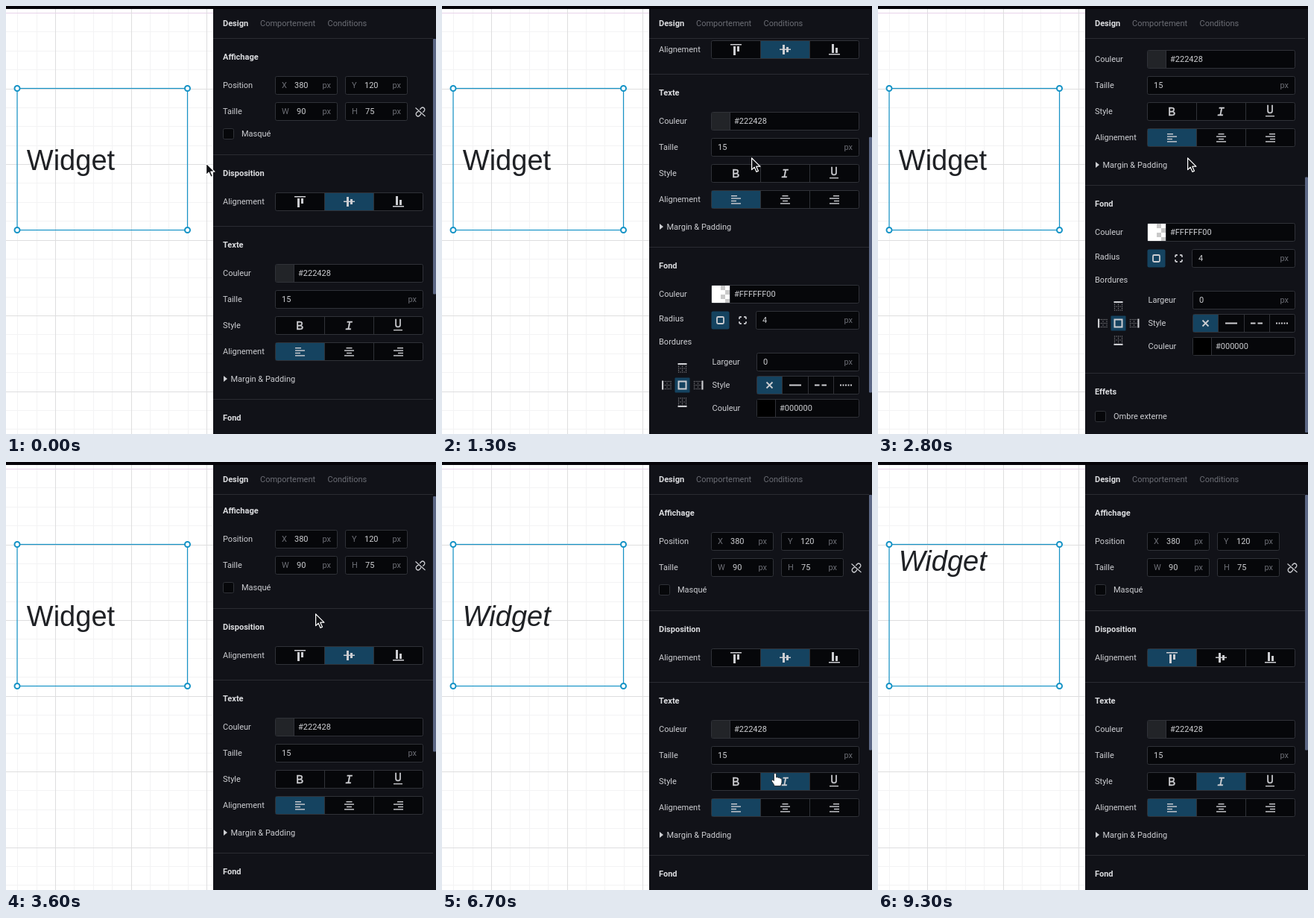
An HTML page with a canvas that plays this animation: 577x574 px, repeating every 9.7 s.

```html
<!DOCTYPE html>
<html lang="fr">
<head>
<meta charset="utf-8">
<title>Widget</title>
<style>
html, body { margin: 0; width: 100%; height: 100%; overflow: hidden; background: #111218; }
canvas { display: block; width: 577px; height: 574px; }
</style>
</head>
<body>
<canvas id="stage" width="577" height="574"></canvas>
<script>
const g = document.getElementById('stage').getContext('2d');
const LOOP = 9700, STEP = 100;
const PANEL = '#111218', FIELD = '#06070a', EDGE = '#303238', RULE = '#2a2b32';
const INK = '#cdced2', TITLE = '#dcdde0', DIM = '#6c6e75', ON = '#154360', BLUE = '#1593c6';
const UI = 'Roboto, sans-serif';
const VIEW_TOP = 44, VIEW_H = 530, MAX_SCROLL = 290;

// [time, scroll offset]
const scrolls = [
  [0, 0], [900, 22], [1000, 74], [1100, 130], [1200, 178], [1300, 204], [1500, 212],
  [1900, 230], [2000, 262], [2100, 284], [2500, 290],
  [2800, 287], [2900, 245], [3000, 180], [3100, 128], [3300, 106],
  [3500, 46], [3600, 3], [3900, 0]
];

// [time, shape, x, y, glide to next]
const moves = [
  [0, 'arrow', 268, 210], [600, 'arrow', 415, 203], [4000, null, 0, 0],
  [4300, 'arrow', 286, 3], [4500, 'hand', 304, 14], [4600, 'hand', 309, 25, 1],
  [4700, 'arrow', 319, 58, 1], [5400, 'arrow', 386, 287, 1], [6300, 'hand', 455, 417],
  [6700, 'hand', 447, 417], [7000, 'arrow', 447, 417, 1], [7300, 'beam', 412, 345],
  [7500, 'arrow', 397, 319], [7700, 'hand', 388, 269], [7900, 'hand', 384, 260],
  [8400, 'arrow', 362, 240], [8600, 'arrow', 329, 188], [8700, 'arrow', 329, 188, 1],
  [9200, 'arrow', 45, 6], [9300, null, 0, 0]
];

const lastIndex = (keys, t) => {
  let i = 0;
  while (i + 1 < keys.length && keys[i + 1][0] <= t) i++;
  return i;
};

function rect(x, y, w, h, c) {
  g.fillStyle = c;
  g.fillRect(x, y, w, h);
}

function line(points, c, w = 1, close = false) {
  g.beginPath();
  points.forEach(([x, y]) => g.lineTo(x, y));
  if (close) g.closePath();
  g.strokeStyle = c;
  g.lineWidth = w;
  g.stroke();
}

function box(x, y, w, h, fill = FIELD, edge = EDGE, r = 2) {
  g.beginPath();
  g.roundRect(x + .5, y + .5, w - 1, h - 1, r);
  g.fillStyle = fill;
  g.fill();
  if (edge) {
    g.strokeStyle = edge;
    g.lineWidth = 1;
    g.stroke();
  }
}

// y is the middle of the line
function text(s, x, y, c = INK, font = '11px ' + UI, align = 'left') {
  g.font = font;
  g.fillStyle = c;
  g.textAlign = align;
  g.fillText(s, x, y + 4);
}

const title = (s, y) => text(s, 291, y, TITLE, 'bold 11px ' + UI);
const divider = y => rect(278, y, 295, 1, RULE);

function field(x, cy, w, value, valueX, prefix, unit) {
  box(x, cy - 12, w, 25);
  if (prefix) text(prefix, x + 9, cy, DIM);
  text(value, valueX, cy);
  if (unit) text('px', x + w - 9, cy, DIM, undefined, 'right');
}

function colorField(x, cy, w, value, swatch) {
  box(x, cy - 12, w, 25);
  rect(x + 1, cy - 11, 24, 23, swatch);
  rect(x + 25, cy - 11, 1, 23, EDGE);
  text(value, x + 31, cy);
}

function segments(x, cy, w, n, active) {
  box(x, cy - 12, w, 25);
  const cell = (w - 1) / n;
  for (let i = 0; i < n; i++) {
    const left = Math.round(x + i * cell);
    if (i === active) rect(left + 1, cy - 11, Math.round(cell) - 1, 23, ON);
    if (i) rect(left, cy - 11, 1, 23, EDGE);
  }
}

function checkbox(label, cy) {
  box(291, cy - 7, 15, 15);
  text(label, 316, cy);
}

function alignIcons(cy) {
  const bars = (x, y1, h1, y2, h2) => {
    rect(x - 3, cy + y1, 3, h1, INK);
    rect(x + 2, cy + y2, 3, h2, INK);
  };
  rect(387, cy - 7, 15, 1.5, INK);
  bars(394, -4, 12, -4, 7);
  rect(453, cy - .5, 15, 1.5, INK);
  bars(460, -6, 13, -3, 7);
  rect(519, cy + 6, 15, 1.5, INK);
  bars(526, -7, 12, -2, 7);
}

function textIcons(cy) {
  [['B', 394, '', 17, 6], ['I', 460, 'italic ', 17, 6], ['U', 526, '', 16, 3]].forEach(([s, x, style, size, dy]) => {
    g.font = `${style}${size}px "Liberation Mono", monospace`;
    g.textAlign = 'center';
    g.fillStyle = g.strokeStyle = INK;
    g.lineWidth = .4;
    g.fillText(s, x, cy + dy);
    g.strokeText(s, x, cy + dy);
  });
  rect(520, cy + 6, 12, 1.3, INK);
}

function paragraphIcons(cy) {
  [[388, 0], [460.5, .5], [533, 1]].forEach(([x, k]) =>
    [8, 13, 7, 13].forEach((w, i) => rect(x - w * k, cy - 5 + i * 3.4, w, 1.4, INK)));
}

function brokenLink(x, y) {
  g.save();
  g.translate(x, y);
  g.rotate(-Math.PI / 4);
  g.strokeStyle = INK;
  g.lineWidth = 1.3;
  [-1, 1].forEach(s => {
    g.beginPath();
    g.roundRect(s * 3.6 - 3.5, -2.8, 7, 5.6, 2.8);
    g.stroke();
  });
  g.restore();
  line([[x - 6, y - 6], [x + 7, y + 6]], PANEL, 3);
  line([[x - 6.5, y - 5.5], [x + 6.5, y + 6]], INK, 1.2);
}

function radiusIcon(x, cy, dashed) {
  g.beginPath();
  g.roundRect(x - 4.5, cy - 4.5, 9, 9, 1.5);
  g.strokeStyle = INK;
  g.lineWidth = 1.8;
  g.stroke();
  if (dashed) {
    rect(x - 1.7, cy - 6, 3.4, 12, PANEL);
    rect(x - 6, cy - 1.7, 12, 3.4, PANEL);
  }
}

// Dotted cell with one solid side
function sideIcon(x, y, dx, dy) {
  for (let i = -5; i <= 5; i += 2.5)
    for (let j = -5; j <= 5; j += 2.5)
      if (i % 5 === 0 || j % 5 === 0) rect(x + i - .6, y + j - .6, 1.2, 1.2, '#85868b');
  if (dx) rect(x + dx * 6 - 1, y - 6, 2, 12, INK);
  else rect(x - 6, y + dy * 6 - 1, 12, 2, INK);
}

function sections(italic, top) {
  title('Affichage', 68);
  text('Position', 291, 106);
  field(361, 106, 84, '380', 387, 'X', true);
  field(455, 106, 84, '120', 481, 'Y', true);
  text('Taille', 291, 141);
  field(361, 141, 84, '90', 390, 'W', true);
  field(455, 141, 84, '75', 482, 'H', true);
  brokenLink(556, 142);
  checkbox('Masqué', 171);
  divider(199);

  title('Disposition', 224);
  text('Alignement', 291, 262);
  segments(361, 262, 199, 3, top ? 0 : 1);
  alignIcons(262);
  divider(295);

  title('Texte', 320);
  text('Couleur', 291, 358);
  colorField(361, 358, 199, '#222428', '#222428');
  text('Taille', 291, 393);
  field(361, 393, 199, '15', 370, '', true);
  text('Style', 291, 428);
  segments(361, 428, 199, 3, italic ? 1 : -1);
  textIcons(428);
  text('Alignement', 291, 463);
  segments(361, 463, 199, 3, 0);
  paragraphIcons(463);
  g.beginPath();
  [[292, 496], [297, 500], [292, 504]].forEach(p => g.lineTo(...p));
  g.fillStyle = INK;
  g.fill();
  text('Margin & Padding', 301.5, 500);
  divider(527);

  title('Fond', 552);
  text('Couleur', 291, 590);
  colorField(361, 590, 199, '#FFFFFF00', '#ffffff');
  for (let i = 0; i < 8; i++)
    rect(374 + (i % 2) * 6, 579 + (i >> 1) * 6, 6, i > 5 ? 5 : 6, (i + (i >> 1)) % 2 ? '#ffffff' : '#c9c9c9');
  text('Radius', 291, 623);
  box(361, 613, 25, 25, ON, null);
  radiusIcon(373.5, 625.5);
  radiusIcon(403.5, 625.5, true);
  field(421, 625, 139, '4', 430, '', true);
  text('Bordures', 291, 654);
  text('Largeur', 362.5, 681);
  field(422, 681, 138, '0', 431, '', true);
  text('Style', 362.5, 712);
  segments(422, 712, 138, 4, 0);
  line([[435.5, 708.5], [443.5, 716.5]], INK, 1.8);
  line([[443.5, 708.5], [435.5, 716.5]], INK, 1.8);
  rect(466, 711.5, 16, 2, INK);
  rect(500, 711.5, 6.5, 2, INK);
  rect(509.5, 711.5, 6.5, 2, INK);
  for (let i = 0; i < 5; i++) rect(534 + i * 3.5, 711.5, 2, 2, INK);
  text('Couleur', 362.5, 743);
  colorField(422, 743, 138, '#000000', '#000000');
  box(312, 702, 21, 21, ON, null, 1);
  g.strokeStyle = INK;
  g.lineWidth = 2;
  g.strokeRect(317.5, 707.5, 10, 10);
  sideIcon(322.5, 690, 0, -1);
  sideIcon(322.5, 735, 0, 1);
  sideIcon(302, 712.5, -1, 0);
  sideIcon(343.5, 712.5, 1, 0);
  divider(779);

  title('Effets', 804);
  checkbox('Ombre externe', 837);
}

function workspace(italic, top) {
  rect(0, 0, 278, 574, '#ffffff');
  const gap = 101.5 / 4;
  for (const major of [false, true]) {
    const c = major ? '#dededf' : '#f3f3f4';
    for (let i = -2; i < 23; i++) {
      if ((i % 4 === 0) !== major) continue;
      rect(Math.floor(66.5 + i * gap), 4, 1, 570, c);
      rect(0, Math.floor(9.5 + i * gap), 278, 1, i ? c : '#e8d3ea');
    }
  }
  g.font = `${italic ? 'italic ' : ''}38px "Liberation Sans", Arial, sans-serif`;
  g.textAlign = 'left';
  g.fillStyle = '#1f2125';
  g.fillText('Widget', 27.8, top ? 146 : 220);
  g.strokeStyle = BLUE;
  g.lineWidth = 1.2;
  g.strokeRect(15, 110.5, 228.5, 190);
  for (const x of [15, 243.5])
    for (const y of [110.5, 300.5]) {
      g.beginPath();
      g.arc(x, y, 3.5, 0, 7);
      g.fillStyle = '#ffffff';
      g.fill();
      g.lineWidth = 2;
      g.stroke();
    }
}

const shapes = {
  arrow: [new Path2D('M.6 .8V16.6L4.2 13.2 7 19.4 9.5 18.3 6.8 12.2H11.9Z'), '#101114', '#ffffff'],
  hand: [new Path2D('M-1.6 1.5Q0-.8 1.6 1.5V6Q3.2 4.9 4.2 6.4 5.9 5.6 6.7 7.2 8.9 6.6 9 9V12.5Q8.6 15 7.4 17.5H-.8Q-1.7 14.5-4.6 11.2-5.4 9.2-3.2 9.2L-1.6 10.6Z'), '#ffffff', '#15161a'],
  beam: [new Path2D('M-3.5 .5H3.5V2H.8V15H3.5V16.5H-3.5V15H-.8V2H-3.5Z'), '#101114', '#ffffff']
};

function cursor(t) {
  const i = lastIndex(moves, t);
  let [t0, kind, x, y, glide] = moves[i];
  if (!kind) return;
  if (glide) {
    const [t1, , nx, ny] = moves[i + 1];
    const k = (t - t0) / (t1 - t0);
    x += (nx - x) * k;
    y += (ny - y) * k;
  }
  const [path, fill, edge] = shapes[kind];
  g.save();
  g.translate(Math.round(x), Math.round(y));
  g.fillStyle = fill;
  g.strokeStyle = edge;
  g.lineWidth = kind === 'hand' ? .8 : 1.2;
  g.lineJoin = 'round';
  g.fill(path);
  g.stroke(path);
  g.restore();
}

function draw(time) {
  const t = Math.floor((time % LOOP) / STEP) * STEP;
  const scroll = scrolls[lastIndex(scrolls, t)][1];
  const italic = t >= 6700, top = t >= 8100;

  workspace(italic, top);
  rect(278, 0, 299, 574, PANEL);
  g.save();
  g.beginPath();
  g.rect(278, VIEW_TOP, 299, VIEW_H);
  g.clip();
  g.translate(0, -scroll);
  sections(italic, top);
  g.restore();

  const ratio = VIEW_H / (VIEW_H + MAX_SCROLL);
  g.beginPath();
  g.roundRect(573, VIEW_TOP + scroll * ratio, 4, VIEW_H * ratio, 1);
  g.fillStyle = '#5c6784';
  g.fill();

  rect(0, 0, 577, 4, '#050308');
  title('Design', 23);
  text('Comportement', 341, 23, DIM);
  text('Conditions', 431.5, 23, DIM);
  rect(278, 43, 295, 1, RULE);
  cursor(t);
}

let start;
function tick(now) {
  start ??= now;
  draw(now - start);
  requestAnimationFrame(tick);
}
draw(0);
requestAnimationFrame(tick);
</script>
</body>
</html>
```
